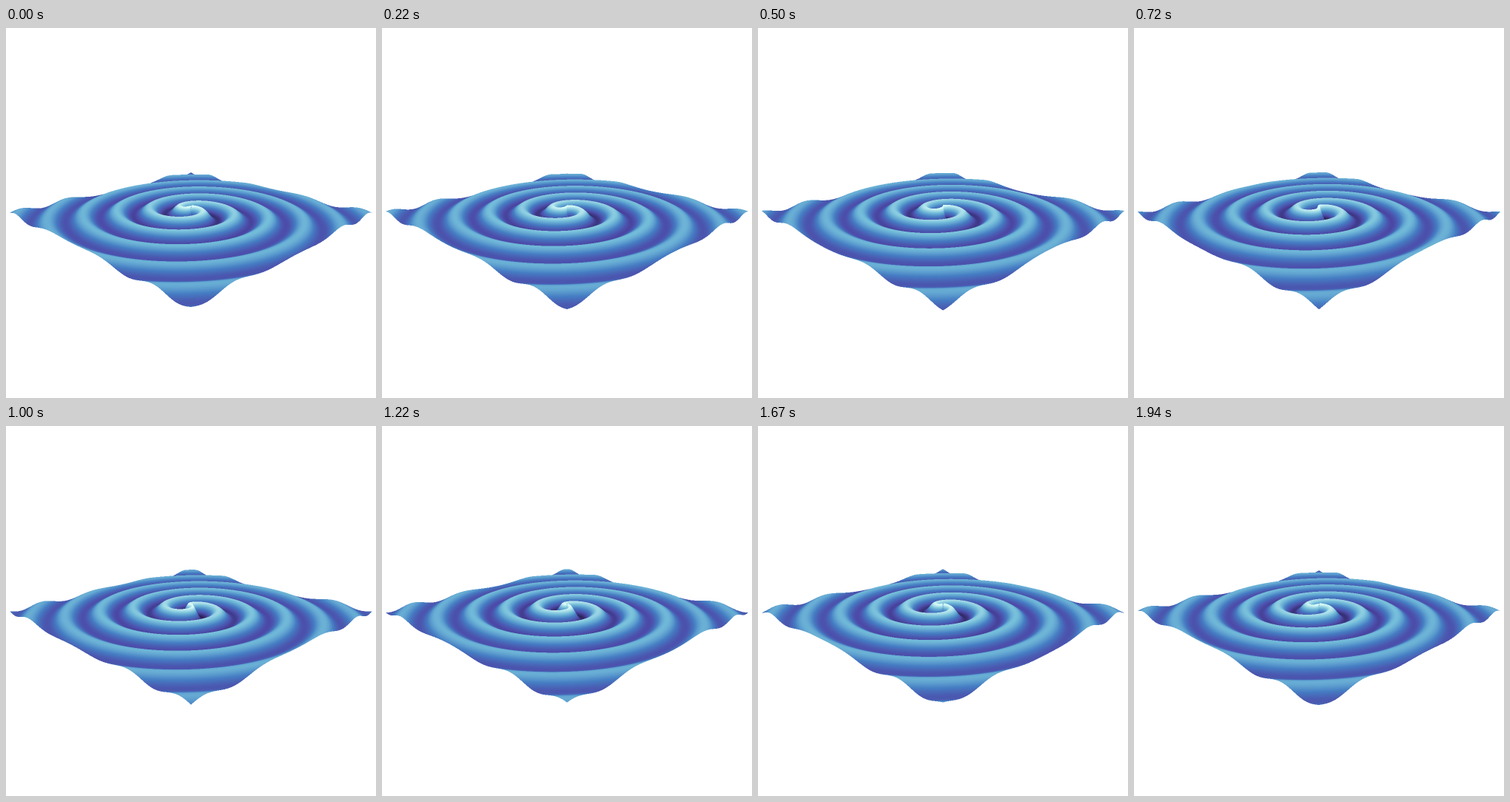
These frames come from a looping animation (500x500 px, 1990 ms). A matplotlib script:

```python
import numpy as np
import matplotlib.pyplot as plt
from matplotlib.animation import FuncAnimation
from matplotlib.colors import LinearSegmentedColormap

SIZE, SS = 500, 2              # stage size, supersampling
TOP, BOTTOM = 188, 386         # rows the surface can reach
TICKS, TICK_MS, FPS = 199, 10, 18
POSES = 36

# Camera: distance and elevation, in units of the square's half diagonal
DIST, ELEV = 2.40, np.arcsin(0.3133)
FOCAL = 245 * DIST
SIN, COS = np.sin(ELEV), np.cos(ELEV)

WAVENUMBER = 2 * np.pi * 5.5
PEAK, LEVELS = 0.048, 104
COLOR_PEAK = 0.038

sea = LinearSegmentedColormap.from_list("sea", [
    (0.00, "#22143f"), (0.27, "#4c4ba9"), (0.50, "#457dc3"),
    (0.73, "#72bbd9"), (1.00, "#dcfff8")])


def amplitude(r):
    return 0.013 / np.sqrt(r + 0.08)


def pixel_rays():
    """Sub-pixel view rays (X across, Y up) for the active rows."""
    x = (np.arange(SIZE * SS) + 0.5) / SS - SIZE / 2
    y = SIZE / 2 - TOP - (np.arange((BOTTOM - TOP) * SS) + 0.5) / SS
    return [a.astype(np.float32) for a in np.meshgrid(x / FOCAL, y / FOCAL)]


def ground(X, Y, h):
    """Where a ray meets height h: u to the right, v towards the viewer."""
    s = (h - DIST * SIN) / (Y * COS - SIN)
    return X * s, DIST * COS - s * (COS + Y * SIN)


X, Y = pixel_rays()
shape = X.shape
u, v = ground(X, Y, 0)
active = np.flatnonzero(np.abs(u) + np.abs(v) < 1.15)
X, Y = X.ravel()[active], Y.ravel()[active]

# Each level keeps the cosine and sine part of the wave along the rays
heights = np.linspace(PEAK, -PEAK, LEVELS)
parts = []
for h in heights:
    u, v = ground(X, Y, h)
    r = np.hypot(u, v)
    phase = WAVENUMBER * r - 2 * np.arctan2(-u, v)
    amp = amplitude(r)
    parts.append(((-amp * np.sin(phase)).astype(np.float32),
                  (amp * np.cos(phase)).astype(np.float32)))


def render(pose):
    turn = 2 * np.pi * pose / (POSES - 1)
    c, s = np.float32(np.cos(turn)), np.float32(np.sin(turn))
    hit = np.full(X.size, np.nan, np.float32)
    last = None
    for i, (a, b) in enumerate(parts):
        gap = np.float32(heights[i]) - (a * c + b * s)
        if last is not None:
            k = np.flatnonzero((last > 0) != (gap > 0))
            k = k[np.isnan(hit[k])]
            w = last[k] / (last[k] - gap[k])
            h = heights[i - 1] + w * (heights[i] - heights[i - 1])
            u, v = ground(X[k], Y[k], h)
            inside = np.abs(u) + np.abs(v) <= 1
            hit[k[inside]] = h[inside]
        last = gap

    seen = ~np.isnan(hit)
    band = np.ones((shape[0] * shape[1], 3), np.float32)
    band[active[seen]] = sea(0.5 + hit[seen] / (2 * COLOR_PEAK))[:, :3]
    band = band.reshape(shape[0] // SS, SS, SIZE, SS, 3).mean(axis=(1, 3))
    image = np.full((SIZE, SIZE, 3), 255, np.uint8)
    image[TOP:BOTTOM] = np.round(band * 255)
    return image


cache = {}


def draw(tick):
    pose = int((tick + 0.5) * FPS * TICK_MS / 1000) % POSES
    if pose not in cache:
        cache[pose] = render(pose)
    picture.set_data(cache[pose])
    return picture,


fig = plt.figure(figsize=(SIZE / 100, SIZE / 100), dpi=100, facecolor="white")
picture = fig.figimage(np.full((SIZE, SIZE, 3), 255, np.uint8), origin="upper")
anim = FuncAnimation(fig, draw, frames=TICKS, interval=TICK_MS,
                     repeat=True, repeat_delay=0, blit=False)
plt.show()
```
